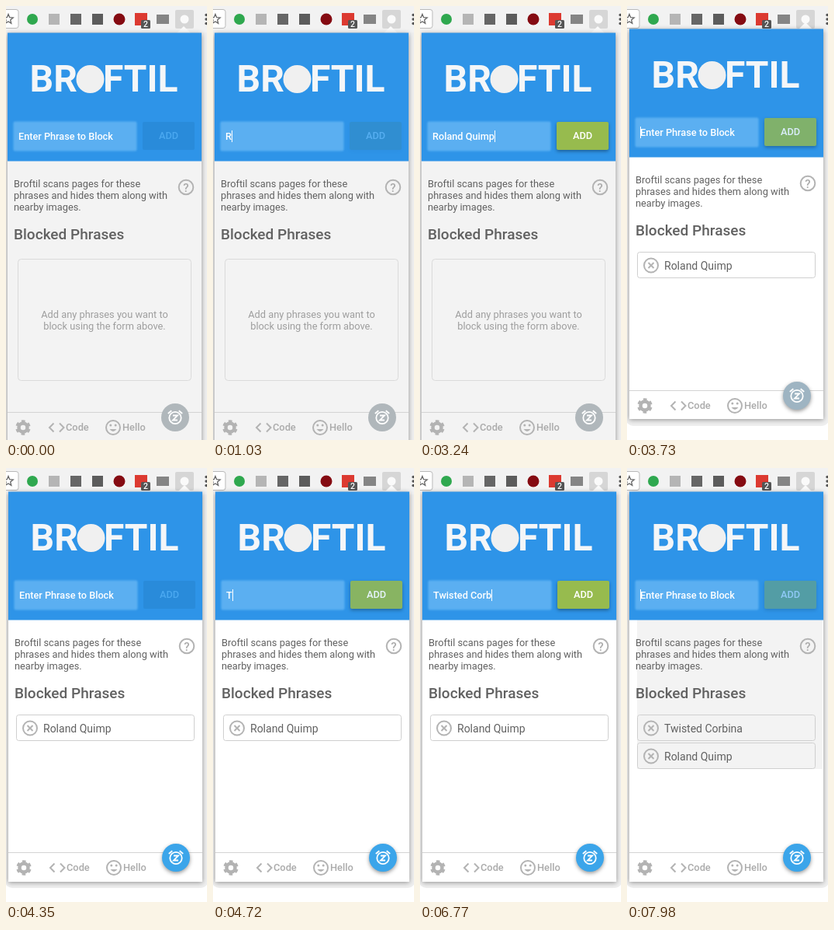
Recreate the animation shown at these times as an HTML page. Size 259 by 558 pixels, loop 8 s.

```html
<!DOCTYPE html>
<html lang="en">
<head>
<meta charset="utf-8">
<title>Phrase blocker popup</title>
<style>
  html, body { margin: 0; width: 100%; height: 100%; overflow: hidden; background: #fff; }
  svg { display: block; width: 259px; height: 558px; }
  text { font: 12.8px Roboto, sans-serif; fill: #616161; white-space: pre; }
  .wordmark { font-size: 48px; font-weight: 700; fill: #f4f6f8; }
  .medium { font-weight: 500; }
  .field text { font-size: 12.7px; font-weight: 500; fill: #fff; }
  .heading { font-size: 19px; font-weight: 500; }
  .item text { font-size: 14px; }
  .middle { text-anchor: middle; }
  .pale { fill: #9e9e9e; }
  .line { fill: none; stroke: #b3b3b3; stroke-width: 2; }
  .item rect { fill: none; stroke: #cfcfcf; }
  .foot text { fill: #aaa; font-weight: 500; }
  .raised { filter: drop-shadow(0 2px 2.5px rgba(0, 0, 0, .4)); }
</style>
</head>
<body>
<svg viewBox="0 0 259 558">
  <rect width="259" height="558" fill="#fff"/>
  <rect id="backdrop" x="-1" y="-10" width="261" height="600" rx="9" fill="#efefef"/>

  <g id="toolbar">
    <rect width="259" height="34" fill="#f2f2f2"/>
    <rect x="-20" y="4.5" width="36" height="24" rx="3" fill="#fff" stroke="#b9b9b9"/>
    <path d="M3 10.500l1.700 4.200 4.500.3-3.500 2.900 1.100 4.400L3 19.900l-3.800 2.400.9-4.400-3.300-2.900 4.500-.3z" fill="none" stroke="#666" stroke-width="1.300"/>
    <circle cx="34" cy="17" r="7" fill="#2fa84f"/>
    <rect x="55" y="10" width="14" height="14" fill="#b5b5b5"/>
    <rect x="83" y="10" width="14" height="14" fill="#666"/>
    <rect x="111" y="10" width="14" height="14" fill="#5c5c5c"/>
    <circle cx="146" cy="17" r="7.500" fill="#850b12"/>
    <rect x="166" y="9" width="16" height="16" fill="#dc3a31"/>
    <rect x="174" y="18" width="12" height="11" rx="1.500" fill="#555"/>
    <text x="180" y="27.300" class="middle medium" style="font-size:10.500px;fill:#fff">2</text>
    <rect x="194" y="11" width="16" height="12" fill="#858585"/>
    <rect x="218" y="5" width="24" height="24" rx="2" fill="#d6d6d6"/>
    <circle cx="230" cy="17" r="5.500" fill="#fafafa"/>
    <g fill="#555">
      <circle cx="258" cy="11.500" r="1.700"/><circle cx="258" cy="17" r="1.700"/><circle cx="258" cy="22.500" r="1.700"/>
    </g>
  </g>

  <g id="popup">
    <path d="M220 35l9-9 9 9z" fill="#fafafa"/>
    <rect id="body" x="2" y="35" width="250" height="600" style="filter:drop-shadow(0 1px 3px rgba(0,0,0,.4))"/>
    <rect id="shade" x="12" y="199" width="239" height="192" fill="#f3f3f3"/>
    <rect x="2" y="34.500" width="250" height="165" fill="#2e94e8"/>
    <text x="30.500" y="109.500" class="wordmark">BR</text>
    <circle cx="108.500" cy="94" r="18" fill="#f0f0f0"/>
    <text x="125" y="109.500" class="wordmark">FTIL</text>

    <g class="field">
      <rect x="9.500" y="148.500" width="159" height="38" rx="2" fill="#5baff1" style="filter:blur(1px)"/>
      <text id="hint" x="16" y="172">Enter Phrase to Block</text>
      <text id="typed" x="16" y="172"></text>
      <rect id="caret" y="160" width="1" height="15" fill="#fff"/>
    </g>
    <rect id="button" x="176" y="149" width="67" height="36" rx="2"/>
    <text id="add" x="209.500" y="170.500" class="middle medium">ADD</text>

    <text x="10" y="233">Broftil scans pages for these</text>
    <text x="10" y="248">phrases and hides them along with</text>
    <text x="10" y="263">nearby images.</text>
    <circle cx="232" cy="233" r="9.300" class="line"/>
    <text x="232" y="238.500" class="middle medium" style="font-size:15px;fill:#aaa">?</text>
    <text x="10" y="300" class="heading">Blocked Phrases</text>

    <g id="empty">
      <rect x="15.500" y="325.500" width="223" height="156" rx="4" fill="none" stroke="#dadada"/>
      <text x="127" y="401" class="middle pale">Add any phrases you want to</text>
      <text x="127" y="416" class="middle pale">block using the form above.</text>
    </g>
    <g id="newer" class="item"></g>
    <g id="older" class="item"></g>
  </g>

  <g id="foot" class="foot">
    <rect x="2" y="522" width="250" height="1" fill="#d4d4d4"/>
    <circle cx="22" cy="542" r="5.500" class="line" style="stroke-width:4.500"/>
    <circle cx="22" cy="542" r="8" class="line" style="stroke-width:3.500" stroke-dasharray="4.400 3.980" stroke-dashoffset="6.390"/>
    <path d="M61.500 536.500l-5.500 5.500 5.500 5.500M69 536.500l5.500 5.500-5.500 5.500" class="line"/>
    <text x="77" y="546">Code</text>
    <circle cx="138" cy="542" r="9" class="line"/>
    <path d="M133.500 544q4.500 6 9 0z" fill="#b3b3b3"/>
    <circle cx="134.800" cy="539" r="1.500" fill="#b3b3b3"/><circle cx="141.200" cy="539" r="1.500" fill="#b3b3b3"/>
    <text x="150" y="546">Hello</text>
    <circle id="snooze" cx="218" cy="529" r="18"/>
    <g fill="none" stroke="#fff" stroke-width="1.800">
      <circle cx="218" cy="529.500" r="7.700"/>
      <path d="M215 526.500h6l-6 6h6M208.800 524l4.500-3.800M227.200 524l-4.500-3.800"/>
    </g>
  </g>
</svg>
<script>
const LOOP = 8000;
const FIRST_ADD = 3730, SECOND_ADD = 7780;
const entries = [
  { text: "Roland Quimp", keys: [1030, 1540, 1780, 1950, 2100, 2270, 2390, 2560, 2740, 2890, 3060, 3240] },
  { text: "Twisted Corbina", keys: [4480, 5020, 5170, 5340, 5490, 5610, 5820, 5970, 6300, 6530, 6620, 6770, 6860, 6960, 7170] }
];
const enabledRamp = [[1010, 0], [1330, 1], [3700, 1], [3850, 0], [4480, 0], [4760, 1], [7820, 1], [8080, 0]];
const snoozeRamp = [[3710, 0], [3850, 1]];

const el = id => document.getElementById(id);
const show = (id, on) => el(id).style.display = on ? "" : "none";
const move = (id, x, y) => el(id).setAttribute("transform", `translate(${x} ${y})`);
const mix = (a, b, p) => `rgb(${a.map((v, i) => Math.round(v + (b[i] - v) * p))})`;

function ramp(points, t) {
  if (t <= points[0][0]) return points[0][1];
  for (let i = 1; i < points.length; i++) {
    const [t0, v0] = points[i - 1], [t1, v1] = points[i];
    if (t < t1) return v0 + (v1 - v0) * (t - t0) / (t1 - t0);
  }
  return points[points.length - 1][1];
}

function fillItem(id, label) {
  el(id).innerHTML = `<rect x="12.5" y="321.5" width="229" height="33" rx="3"/>
    <circle cx="30" cy="338.500" r="9" class="line"/>
    <path d="M26.500 335l7 7m0-7l-7 7" class="line"/>
    <text x="47" y="344">${label}</text>`;
}

function typedAt(t) {
  if (t >= SECOND_ADD) return "";
  const entry = entries[t < FIRST_ADD ? 0 : 1];
  return entry.text.slice(0, entry.keys.filter(k => k <= t).length);
}

function drawField(t) {
  const value = typedAt(t);
  const caretOff = t < 460 || (t >= 910 && t < 1030) || (t >= 4350 && t < 4480);
  el("typed").textContent = value;
  show("hint", !value);
  show("caret", !caretOff);
  el("caret").setAttribute("x", 16 + (value ? Math.round(el("typed").getComputedTextLength()) : 0));
}

function draw(t) {
  const added = t >= FIRST_ADD, addedTwice = t >= SECOND_ADD;
  move("popup", added ? 1 : 0, added ? (t < 3790 ? -5 : -4) : 0);
  move("foot", added ? 1 : 0, added ? -28 : 0);
  el("body").setAttribute("height", added ? 501 : 600);
  el("body").setAttribute("fill", added ? "#fff" : "#f3f3f3");
  el("backdrop").setAttribute("height", added ? 550 : 600);
  show("empty", !added);
  show("older", added);
  show("newer", addedTwice);
  show("shade", addedTwice);
  move("older", 0, addedTwice ? 36 : 0);
  drawField(t);

  const enabled = ramp(enabledRamp, t), awake = ramp(snoozeRamp, t);
  el("button").style.fill = mix([41, 139, 218], [151, 187, 78], enabled);
  el("button").style.filter = `drop-shadow(0 2px 2px rgba(0,0,0,${0.35 * enabled}))`;
  el("add").style.fill = mix([74, 168, 240], [255, 255, 255], enabled);
  el("snooze").style.fill = mix([176, 183, 187], [59, 165, 234], awake);
  el("snooze").classList.toggle("raised", added);
}

fillItem("older", entries[0].text);
fillItem("newer", entries[1].text);
const start = performance.now();
function tick() {
  draw((performance.now() - start) % LOOP);
  requestAnimationFrame(tick);
}
tick();
</script>
</body>
</html>
```
